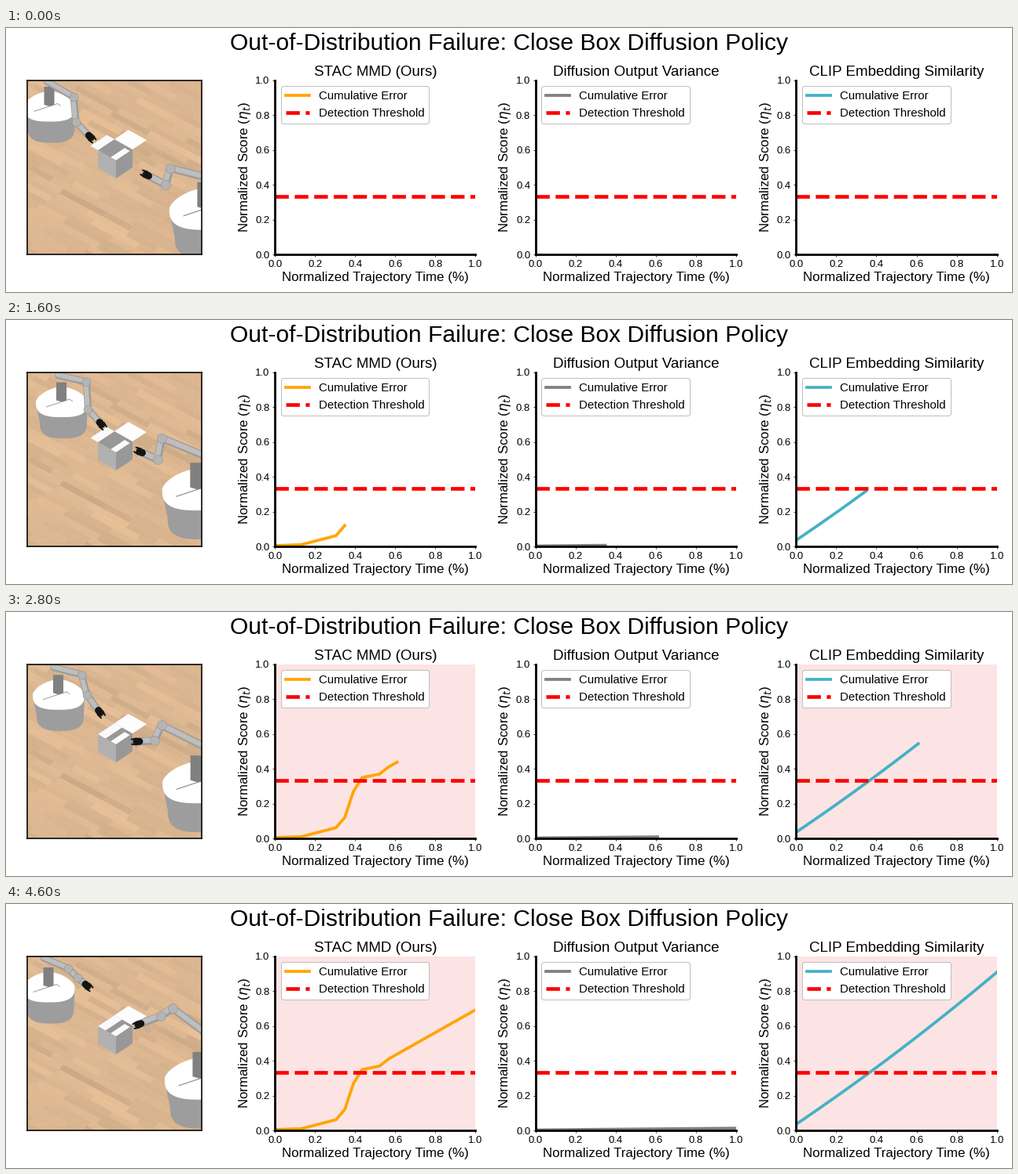
A matplotlib script for the animation above (6800 ms loop, 1280x337 px).

```python
import random

import matplotlib.pyplot as plt
import numpy as np
from matplotlib.animation import FuncAnimation
from matplotlib.collections import PolyCollection
from matplotlib.patches import Polygon

W, H, DPI = 1280, 337, 64
PX = 72 / DPI            # points per pixel
PT = 0.9375 * PX         # scale of all type and plot lines
LAST = 23                # steps until the curves are complete
GRASP = 10               # step at which both hands are at the box
TOP, BOTTOM = 66.9, 289.1
THRESHOLD = 0.333

plt.rcParams.update({
    "font.family": "Liberation Sans",
    "mathtext.fontset": "dejavusans",
    "axes.linewidth": 3 * PT,
    "axes.titlesize": 20 * PT,
    "axes.titlepad": 6 * PT,
    "axes.labelsize": 18 * PT,
    "axes.labelpad": 4 * PT,
    "legend.fontsize": 16 * PT,
    "patch.linewidth": PT,
})
for axis in ("xtick", "ytick"):
    plt.rcParams.update({
        f"{axis}.labelsize": 14 * PT,
        f"{axis}.major.size": 3.5 * PT,
        f"{axis}.major.pad": 3.5 * PT,
        f"{axis}.major.width": 0.8 * PT,
    })

fig = plt.figure(figsize=(W / DPI, H / DPI), dpi=DPI, facecolor="white")


def pixel_axes(x0, x1):
    return fig.add_axes([x0 / W, 1 - BOTTOM / H, (x1 - x0) / W, (BOTTOM - TOP) / H])


def grey(v):
    return (v / 255,) * 3


fig.text(0.5, 1 - 28.5 / H, "Out-of-Distribution Failure: Close Box Diffusion Policy",
         size=32 * PT, ha="center", va="baseline")

# ---- score panels ----
steps = np.arange(LAST + 1)
stac = np.interp(steps, [0, 3, 7, 8, 9, 10, 12, 13, LAST],
                 [.005, .010, .062, .120, .270, .350, .370, .410, .693])
variance = 0.003 + 0.010 * steps / LAST
clip = 0.036 + 0.0338 * steps + 0.00018 * steps ** 2

PANELS = [
    ("STAC MMD (Ours)", "orange", stac),
    ("Diffusion Output Variance", "gray", variance),
    ("CLIP Embedding Similarity", "#44b2c4", clip),
]

panels = []
for i, (title, color, scores) in enumerate(PANELS):
    left = 342.2 + 331.6 * i
    ax = pixel_axes(left, left + 255.2)
    curve, = ax.plot([], [], color=color, lw=4 * PT, label="Cumulative Error")
    ax.axhline(THRESHOLD, color="red", ls="--", lw=5 * PT, label="Detection Threshold")
    ax.set(xlim=(0, 1), ylim=(0, 1), title=title,
           xlabel="Normalized Trajectory Time (%)",
           ylabel=r"Normalized Score ($\eta_t$)",
           xticks=np.linspace(0, 1, 6), yticks=np.linspace(0, 1, 6))
    ax.spines[["top", "right"]].set_visible(False)
    ax.legend(loc="upper left", framealpha=1, edgecolor="#bbbbbb")
    panels.append((ax, curve, scores))

# ---- robot scene, in stage pixels ----
scene = pixel_axes(27, 249)
scene.set(xlim=(27, 249), ylim=(BOTTOM, TOP), xticks=[], yticks=[])
for spine in scene.spines.values():
    spine.set_linewidth(1.6 * PX)
    spine.set_zorder(20)


def lay_floor():
    rng = random.Random(4)
    along, across = np.array([0.88, 0.47]), np.array([-5, 6.2])
    planks, colors = [], []
    for row in range(-24, 25):
        t = -210 - rng.random() * 50
        while t < 210:
            length = rng.uniform(32, 68)
            a = np.array([138, 178]) + along * t + across * row
            b = a + along * length
            planks.append([a, b, b + across, a + across])
            shade = rng.gauss(1, 0.025)
            colors.append([min(1, c / 255 * shade) for c in (218, 181, 143)])
            t += length
    scene.add_collection(PolyCollection(planks, facecolors=colors, edgecolors=colors,
                                        linewidths=0.4, zorder=1))


def poly(points, color, z):
    p = Polygon(points, closed=True, facecolor=color, edgecolor="none", zorder=z)
    return scene.add_patch(p)


def stroke(color, width, z):
    line, = scene.plot([], [], color=color, lw=width * PX, zorder=z,
                       solid_capstyle="round", solid_joinstyle="round")
    return line


def rounded(cx, cy, rx, ry, start=0, stop=2 * np.pi):
    """Diamond-like far edge, boxy near edge; y points down."""
    t = np.linspace(start, stop, 60)
    c, s = np.cos(t), np.sin(t)
    p = 2 / np.where(s < 0, 1.6, 2.8)
    return np.column_stack([cx + rx * np.sign(c) * abs(c) ** p,
                            cy + ry * np.sign(s) * abs(s) ** p])


class Base:
    def __init__(self, center, scale, z):
        self.center, self.scale = np.array(center), scale
        lid = rounded(0, 0, 33, 19.5)
        foot = rounded(2, 26, 30, 20.5, 0, np.pi)
        body = np.vstack([[33, 2], foot, [-33, 2], [0, -8]])
        post = np.array([(-7, -25), (6, -25), (6, -2), (0, 0), (-7, -2)])
        seam = np.array([(-20, 6), (10, -4), (14, -1), (14, 0), (10, -3), (-20, 7)])
        self.parts = [(poly(pts, grey(tone), z + 0.1 * i), pts) for i, (pts, tone)
                      in enumerate([(body, 157), (lid, 255), (seam, 150), (post, 128)])]

    def place(self, dx, dy):
        for patch, pts in self.parts:
            patch.set_xy(pts * self.scale + self.center + [dx, dy])


class Arm:
    def __init__(self, z, width, poses):
        self.poses = np.array(poses, float)
        self.shade = stroke(grey(155), width, z)
        self.light = stroke(grey(190), width * 0.65, z + 0.1)
        self.joints, = scene.plot([], [], "o", ms=width * 1.2 * PX, mfc=grey(180),
                                  mec=grey(150), mew=0.7, zorder=z + 0.2)
        self.hand = stroke(grey(20), 9, z + 0.3)
        self.fingers = [stroke(grey(20), 2, z + 0.4) for _ in range(2)]

    def place(self, phase):
        i = min(int(phase), len(self.poses) - 2)
        f = phase - i
        pts = self.poses[i] * (1 - f) + self.poses[i + 1] * f
        tip, d = pts[-1], pts[-1] - pts[-2]
        d = d / np.hypot(*d)
        n = np.array([-d[1], d[0]])
        self.shade.set_data(*pts.T)
        self.light.set_data(*(pts - 0.8).T)
        self.joints.set_data(*pts[1:3].T)
        self.hand.set_data(*np.array([tip - 4 * d, tip]).T)
        for line, s in zip(self.fingers, (-1, 1)):
            line.set_data(*np.array([tip + 4 * s * n, tip + 6 * d + 3 * s * n]).T)


# box, built from its front corner and three edge vectors
FRONT = np.array([140, 169])
A, B, DOWN = np.array([-23, -13]), np.array([21, -14]), np.array([0, 23])


def quad(corner, u, v):
    return [corner, corner + u, corner + u + v, corner + v]


lay_floor()
poly(quad(FRONT, A, B), grey(152), 3)
poly(quad(FRONT, 0.3 * A, 0.85 * B), grey(250), 3.1)
poly(quad(FRONT, A, DOWN), grey(176), 3.2)
poly(quad(FRONT, B, DOWN), grey(152), 3.2)
poly(quad(FRONT + B, A, 0.85 * B), grey(253), 3.3)
flap = poly(quad(FRONT + A, B, 0.4 * A), grey(250), 3.4)

base1 = Base((72.5, 105), 1, 2)
base2 = Base((243, 215), 1.37, 6)

# shoulder, elbow, wrist, hand: at the start, at the grasp, midway out, at the end
arm1 = Arm(4, 9, [
    [(52, 68), (86, 88), (89, 120), (108, 140)],
    [(68, 71), (104, 78), (106, 113), (123, 133)],
    [(57, 71), (91, 81), (101, 101), (118, 126)],
    [(48, 69), (79, 82), (91, 94), (104, 105)],
])
arm2 = Arm(7, 10, [
    [(256, 191), (209, 179), (203, 200), (178, 187)],
    [(256, 173), (197, 148), (192, 176), (169, 166)],
    [(256, 174), (198, 142), (187, 157), (164, 165)],
    [(256, 166), (212, 133), (197, 143), (168, 154)],
])


def draw(frame):
    k = min(frame, LAST)
    for ax, curve, scores in panels:
        curve.set_data(steps[:k + 1] / LAST, scores[:k + 1])
        ax.set_facecolor("#fde4e4" if scores[k] > THRESHOLD else "white")

    away = max(0, 1 - k / GRASP) ** 1.5             # still to go before the grasp
    back = max(0, (k - GRASP) / (LAST - GRASP))     # progress of the retreat
    base1.place(-17 * away - 18 * back, -5 * away + back)
    base2.place(10 * away + 4 * back, 16 * away + 8 * back)
    arm1.place(1 - away + 2 * back)
    arm2.place(1 - away + 2 * back)

    turn = np.pi * (1 - np.clip((k - GRASP) / 3, 0, 1))
    lean = -0.42 * np.cos(turn) * A - 0.5 * np.sin(turn) * DOWN
    flap.set_xy(quad(FRONT + A, B, lean))
    return []


anim = FuncAnimation(fig, draw, frames=34, interval=200, init_func=lambda: draw(0),
                     repeat=True, repeat_delay=0, blit=False)
plt.show()
```
